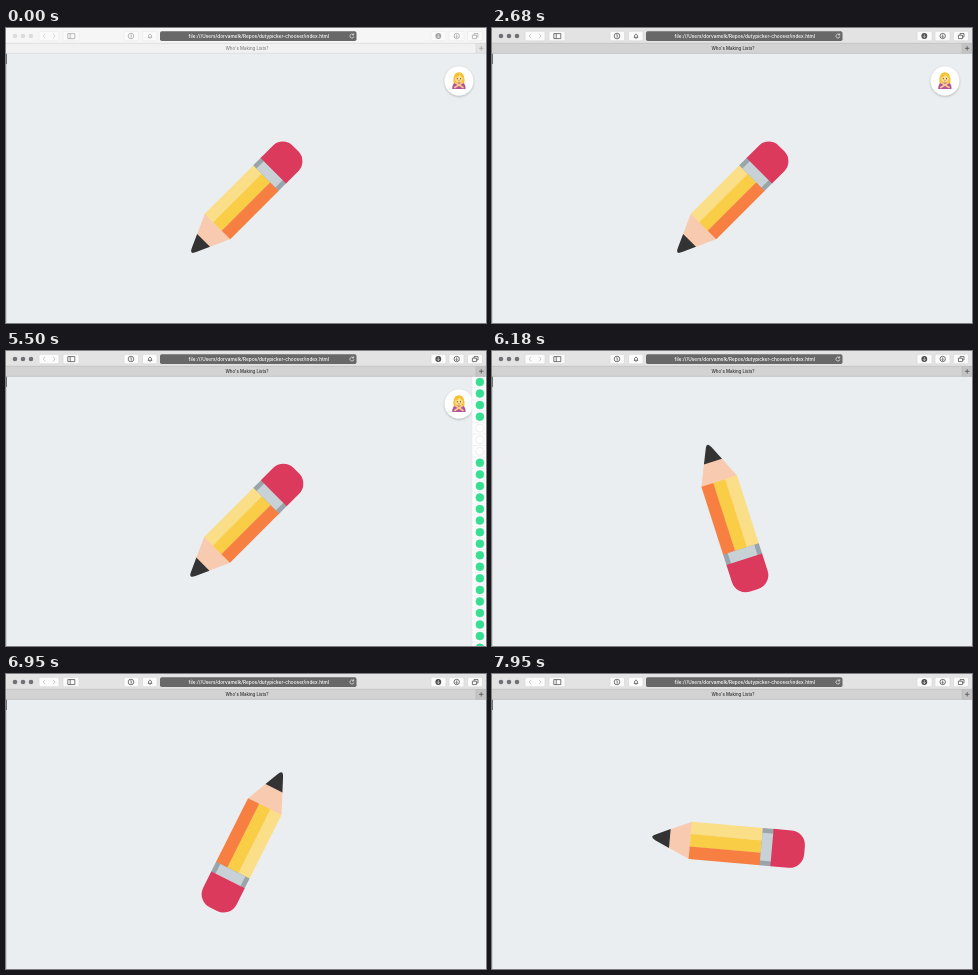
Recreate the animation shown at these times as an HTML page. Size 480 px wide and 295 px high, loop 8000 ms.

```html
<!DOCTYPE html>
<html lang="en">
<head>
<meta charset="utf-8">
<title>Who's Making Lists?</title>
<style>
  html, body { margin: 0; width: 100%; height: 100%; overflow: hidden; background: #eaeef1; }
  svg { display: block; width: 100vw; height: 100vh; font-family: Inter, "Liberation Sans", sans-serif; }
  #chrome {
    --bar: #f6f6f6; --tabs: #f1f1f1; --line: #d3d3d3; --plus: #e4e4e4;
    --light: #dcdcdc; --ink: #a3a3a3; --title: #858585; --key: #fafafa; --rim: #e4e4e4; --faint: #cfcfcf;
  }
  #chrome.active {
    --bar: #e4e3e4; --tabs: #d3d3d3; --line: #b5b5b5; --plus: #c4c4c4;
    --light: #717175; --ink: #4d4d4d; --title: #333; --key: #fbfbfb; --rim: #cfcfcf; --faint: #bdbdbd;
  }
  .bar { fill: var(--bar); }
  .tabs { fill: var(--tabs); }
  .plus { fill: var(--plus); }
  .light { fill: var(--light); }
  .key { fill: var(--key); stroke: var(--rim); stroke-width: .5; }
  .line { stroke: var(--line); stroke-width: .6; }
  .icon { fill: none; stroke: var(--ink); stroke-width: .75; }
  .faint { fill: none; stroke: var(--faint); stroke-width: .8; }
  .solid { fill: var(--ink); }
  .title { fill: var(--title); font-size: 4.4px; font-weight: 500; text-anchor: middle; }
  .url { fill: #fff; font-size: 4.75px; font-weight: 500; text-anchor: middle; }
  .row text { font-size: 5.65px; font-weight: 700; fill: #2d3033; }
  .row circle { fill: #37df92; stroke: #37df92; stroke-width: .5; }
  .row.off text { font-weight: 400; fill: #5c6064; }
  .row.off circle { fill: #fff; stroke: #d9dddf; }
</style>
</head>
<body>
<svg viewBox="0 0 480 295" preserveAspectRatio="none">
  <defs>
    <filter id="shadow" x="-30%" y="-30%" width="160%" height="160%">
      <feDropShadow dx="0" dy=".8" stdDeviation="1" flood-color="#000" flood-opacity=".3"/>
    </filter>
  </defs>
  <rect width="480" height="295" fill="#eaeef1"/>

  <g id="pencil">
    <path fill="#f8cbb0" d="M-40 -18L-60.3 -9V9L-40 18Z"/>
    <path fill="#333" d="M-60 -9.1L-73.5 -3Q-80.5 0 -73.5 3L-60 9.1Z"/>
    <rect x="-40.3" y="-18" width="69" height="12.2" fill="#fade88"/>
    <rect x="-40.3" y="-6" width="69" height="12.2" fill="#facd46"/>
    <rect x="-40.3" y="6" width="69" height="12" fill="#f67f41"/>
    <rect x="28.2" y="-18" width="11" height="36" fill="#9aa4ab"/>
    <rect x="28.2" y="-13.4" width="11" height="26.8" fill="#c8d1d6"/>
    <path fill="#dc3a5c" d="M38.6 -18H56A14 14 0 0 1 70 -4V4A14 14 0 0 1 56 18H38.6Z"/>
  </g>

  <g id="button">
    <circle cx="453" cy="53" r="14.4" fill="#fff" filter="url(#shadow)"/>
    <path fill="#f3c331" d="M447.6 56Q446 44.5 452.8 44.2Q459.8 44.5 458.3 56Z"/>
    <circle cx="452.9" cy="50.3" r="3.9" fill="#fcdc94"/>
    <path fill="#f3c331" d="M448.6 50Q452 49.2 453.6 46.4Q455 48.8 457.3 50Q457.6 44.8 452.9 44.8Q448.4 45 448.6 50Z"/>
    <path fill="#4c3b35" d="M450.8 50.2h1v1.1h-1zM454 50.2h1v1.1h-1z"/>
    <path stroke="#c5566b" stroke-width=".6" d="M451.9 52.8h2"/>
    <path fill="#b452a0" d="M446.2 61Q446 55.2 450.2 54.8H455.8Q459.8 55.2 459.6 61Z"/>
    <path fill="none" stroke="#f7cc86" stroke-width="1.6" stroke-linecap="round" d="M448.8 59.5L456.3 54.8M457 59.5L449.6 54.8"/>
  </g>

  <g id="panel">
    <rect x="385" y="25" width="96" height="270" fill="#fcfdfd"/>
    <path d="M385 25V295" stroke="#dfe4e7" stroke-width=".6"/>
  </g>

  <path d="M.3 25V295" stroke="#b4b8bb" stroke-width=".6"/>
  <path d="M.4 25V36" stroke="#4a4a4a" stroke-width=".8"/>

  <g id="chrome">
    <rect class="bar" width="480" height="15.5"/>
    <rect class="tabs" y="15.3" width="480" height="10.2"/>
    <rect class="plus" x="470" y="15.3" width="10" height="10.2"/>
    <path class="line" d="M0 15.3H480M0 25.3H480M470 15.3V25.3"/>
    <circle class="light" cx="9" cy="8" r="2.3"/>
    <circle class="light" cx="17" cy="8" r="2.3"/>
    <circle class="light" cx="25" cy="8" r="2.3"/>
    <g id="keys"></g>
    <path class="faint" d="M39.3 5.8L37.2 8L39.3 10.2M47 5.8L49.1 8L47 10.2"/>
    <path class="icon" d="M61.8 5.6H68.8V10.6H61.8ZM64.2 5.6V10.6"/>
    <circle class="icon" cx="125" cy="8" r="2.8"/>
    <path class="icon" d="M124.5 6.7H125.2V9.7"/>
    <path class="icon" d="M141.8 9.4H146.2M142.6 9.2V7.2Q144 4.6 145.4 7.2V9.2M143.5 10.5H144.5"/>
    <circle class="solid" cx="432.3" cy="8" r="2.9"/>
    <path d="M432.3 6.2V9.5M431 8.3L432.3 9.6L433.6 8.3" fill="none" stroke="#fff" stroke-width=".6"/>
    <circle class="icon" cx="450.7" cy="8" r="2.7"/>
    <path class="icon" d="M450.7 6.4V9.5M449.7 8.5L450.7 9.5L451.7 8.5"/>
    <path class="icon" d="M466.4 7.2H470.4V10.6H466.4ZM468 7V5.6H472V9H470.6"/>
    <rect x="154" y="3.2" width="196.5" height="9.8" rx="1.8" fill="#686868"/>
    <text class="url" x="252.8" y="9.8">file:///Users/dorvamelk/Repos/dutypicker-chooser/index.html</text>
    <path d="M347.4 6.7A2 2 0 1 0 347.9 8.4M347.7 5.3V7H346" fill="none" stroke="#fff" stroke-width=".6"/>
    <text class="title" x="241" y="21.9">Who's Making Lists?</text>
    <path class="icon" d="M473 20.3H477.4M475.2 18.1V22.5"/>
  </g>
</svg>
<script>
  const LOOP = 8000;
  const NAMES = ("Arlo Aldren Avoni Bowen Burl Byram Celdo Corwy Cundal Elvra Gemlo Hartwen " +
    "Ivo Izor Jeld Kerro Maldea Merrowe Mondi Nela Renzo Rudek Tevin Vilmo").split(" ");
  const ROW = 11.55;
  const SWITCHED_OFF = { 6: 3560, 5: 4040, 4: 4560 };   // row index: time
  const KEYS = [[33, 20], [57, 16], [118, 14.5], [136.5, 14.5], [425, 15], [443, 15], [461.5, 15]];

  const $ = id => document.getElementById(id);
  const add = (parent, tag, attrs, text = "") => {
    const el = document.createElementNS("http://www.w3.org/2000/svg", tag);
    for (const name in attrs) el.setAttribute(name, attrs[name]);
    el.textContent = text;
    return parent.appendChild(el);
  };

  for (const [x, width] of KEYS) {
    add($("keys"), "rect", { class: "key", x, y: 3.3, width, height: 9.5, rx: 1.6 });
  }

  const rows = NAMES.map((name, i) => {
    const y = 31 + i * ROW;
    const row = add($("panel"), "g", { class: "row" });
    add(row, "path", { d: `M385 ${y + ROW / 2}H480`, stroke: "#e4e8ea", "stroke-width": 0.5 });
    add(row, "circle", { cx: 393, cy: y, r: 4 });
    add(row, "text", { x: 401, y: y + 2 }, name);
    return row;
  });

  const progress = (t, start, length) => Math.min(1, Math.max(0, (t - start) / length));
  const easeOut = p => 1 - (1 - p) ** 3;
  const smooth = p => p * p * (3 - 2 * p);

  // Clockwise spin that keeps gaining speed
  const spin = t => {
    const x = t - 6500;
    return t < 5936 ? 0 : Math.max(0, 278 + 0.519 * x + 4.7e-5 * x * x);
  };

  const hover = t =>
    smooth(progress(t, 1780, 250)) - smooth(progress(t, 2290, 250)) + smooth(progress(t, 5390, 260));

  function draw(t) {
    $("chrome").classList.toggle("active", t >= 770);

    const open = easeOut(progress(t, 2720, 300)) - easeOut(progress(t, 5363, 300));
    $("panel").setAttribute("transform", `translate(${96 * (1 - open)} 0)`);
    rows.forEach((row, i) => row.classList.toggle("off", t >= SWITCHED_OFF[i]));

    $("button").setAttribute("opacity", 1 - progress(t, 5880, 180));
    $("pencil").setAttribute("transform",
      `translate(240 170) rotate(${spin(t) - 45}) scale(${1 + 0.04 * hover(t)})`);
  }

  const began = performance.now();
  function tick() {
    draw((performance.now() - began) % LOOP);
    requestAnimationFrame(tick);
  }
  tick();
</script>
</body>
</html>
```
